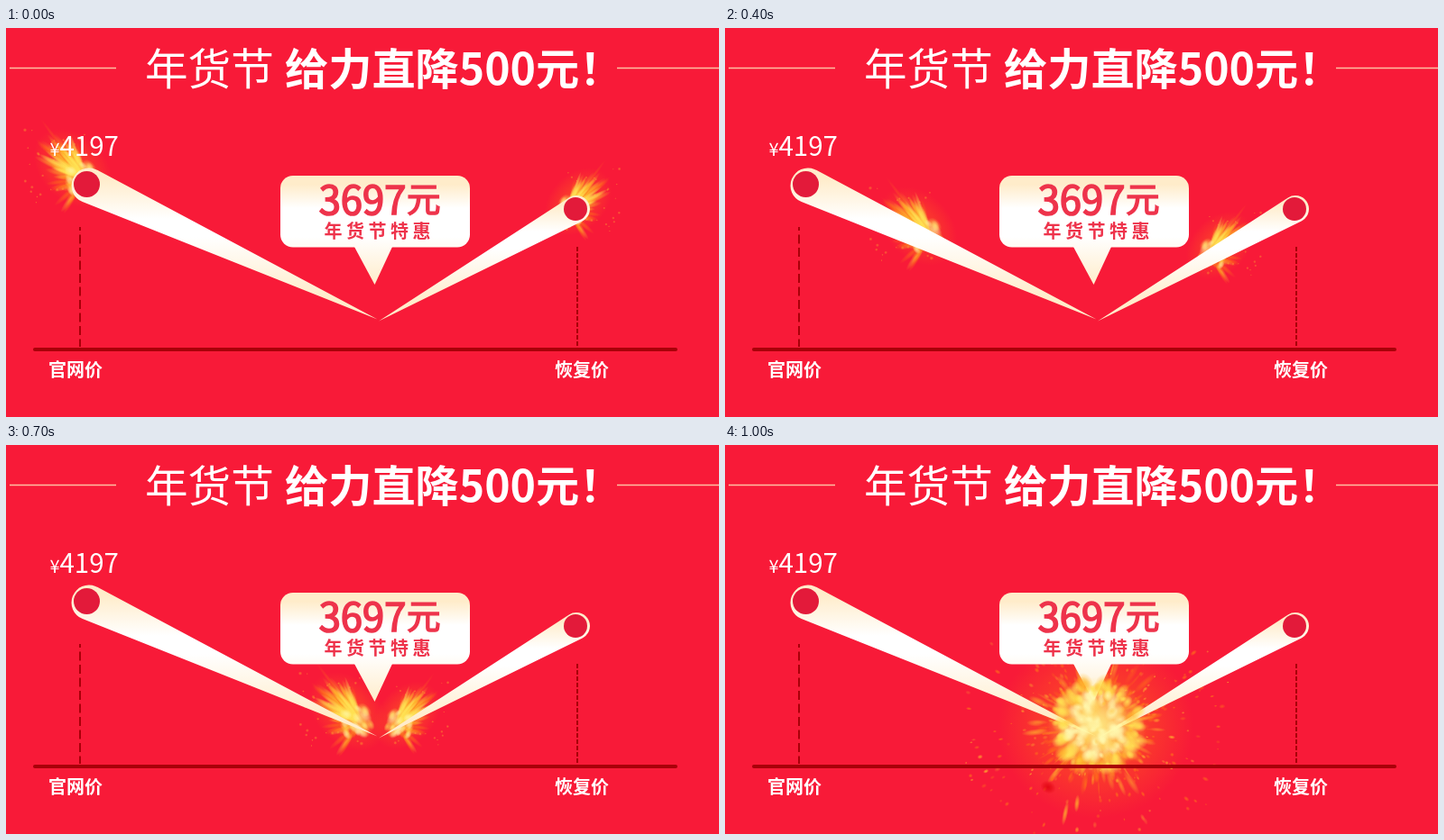
Animation, 790 px wide and 432 px high, one loop 1400 ms. Source, as an HTML page with a canvas:

```html
<!DOCTYPE html>
<html lang="zh-CN">
<head>
<meta charset="utf-8">
<title>年货节</title>
<style>
html, body { margin: 0; width: 100%; height: 100%; overflow: hidden; background: #f81a38; }
canvas { display: block; width: 790px; height: 432px; }
</style>
</head>
<body>
<canvas id="stage" width="790" height="432"></canvas>
<script>
const ctx = document.getElementById('stage').getContext('2d');
const LOOP = 1400, STEP = 100, LAST = 10;
const FONT = '"Noto Sans CJK SC", "Noto Sans CJK", "Noto Sans SC", sans-serif';
const CREAM = '#ffecca', DARK = '#a90009', RED = '#e31a3a', PRICE = '#ee334b';
const ORANGE = '255,112,24', AMBER = '255,184,44', YELLOW = '255,228,84', PALE = '255,249,176';

const TAU = Math.PI * 2;

// positions of the two fireballs along their beams, one per step
const leftX = [88, 108, 132, 161, 228, 299, 347, 393];
const rightX = [622, 602, 577, 549, 536, 519, 474, 432];
const power = [1, 0.75, 0.8, 0.85, 0.95, 1, 1, 1];

function rng(seed) {
  return () => {
    seed = (seed + 0x6d2b79f5) | 0;
    let t = Math.imul(seed ^ (seed >>> 15), 1 | seed);
    t = (t + Math.imul(t ^ (t >>> 7), 61 | t)) ^ t;
    return ((t ^ (t >>> 14)) >>> 0) / 4294967296;
  };
}

function blob(x, y, rx, ry, angle, rgb, alpha) {
  ctx.save();
  ctx.translate(x, y);
  ctx.rotate(angle);
  ctx.scale(rx, ry);
  const g = ctx.createRadialGradient(0, 0, 0, 0, 0, 1);
  g.addColorStop(0, `rgba(${rgb},${alpha})`);
  g.addColorStop(0.5, `rgba(${rgb},${alpha * 0.6})`);
  g.addColorStop(1, `rgba(${rgb},0)`);
  ctx.fillStyle = g;
  ctx.beginPath();
  ctx.arc(0, 0, 1, 0, TAU);
  ctx.fill();
  ctx.restore();
}

function ray(angle, from, len, width, rgb, alpha) {
  const mid = from + len / 2;
  blob(Math.cos(angle) * mid, Math.sin(angle) * mid, len / 2, width, angle, rgb, alpha);
}

function flame(x, y, dir, size, p) {
  const r = rng(21);
  ctx.save();
  ctx.translate(x, y);
  ctx.scale(dir * size, size);
  blob(-14, -12, 50, 36, 0.8, ORANGE, 0.5 * p);
  for (let i = 0; i < 28; i++) {
    const a = -2.35 + (r() + r() - 1) * 0.75;
    ray(a, r() * 24, 22 + r() * 40, 1.6 + r() * 2.6, r() < 0.4 ? ORANGE : AMBER, (0.35 + r() * 0.5) * p);
  }
  for (let i = 0; i < 16; i++) {
    ray(2 + r() * 1.5, 4 + r() * 12, 12 + r() * 30, 1.5 + r() * 2.5, r() < 0.6 ? ORANGE : AMBER, 0.6 * p);
  }
  for (let i = 0; i < 30; i++) {
    const s = 1 + r() * 1.5;
    blob(-70 + r() * 88, -58 + r() * 90, s, s, 0, AMBER, 0.45 * p);
  }
  for (let i = 0; i < 16; i++) {
    const a = -2.3 + (r() - 0.5) * 1.1;
    ray(a, r() * 12, 16 + r() * 36, 1.4 + r() * 2, YELLOW, 0.8 * p);
  }
  blob(-6, -4, 24, 16, 0.8, YELLOW, 0.85 * p);
  for (let i = 0; i < 26; i++) {
    const s = 3 + r() * 5;
    blob(-22 + r() * 34, -16 + r() * 30, s * 1.3, s * 0.8, 0.6 + r() * 0.6, r() < 0.4 ? YELLOW : PALE, 0.6 * p);
  }
  ctx.restore();
}

function halo(x, y, size, rays, sparks, reach) {
  const r = rng(77);
  ctx.save();
  ctx.translate(x, y);
  blob(0, 0, size * 2, size * 1.9, 0, ORANGE, 0.65);
  for (let i = 0; i < rays; i++) {
    const a = r() * TAU;
    ray(a, size * (0.5 + r() * 0.6), size * (0.1 + r() * 0.5), 1.2 + r() * size * 0.06,
      r() < 0.55 ? ORANGE : AMBER, 0.3 + r() * 0.4);
  }
  for (let i = 0; i < sparks; i++) {
    const a = r() * TAU, d = size * (1 + Math.pow(r(), 1.8) * reach), s = 1 + r() * 1.5;
    blob(Math.cos(a) * d, Math.sin(a) * d * 0.92, s * (1 + r()), s, a, r() < 0.6 ? ORANGE : AMBER, 0.25 + r() * 0.6);
  }
  ctx.restore();
}

function core(x, y, size) {
  const r = rng(5);
  ctx.save();
  ctx.translate(x, y);
  blob(0, 0, size * 1.1, size * 1.1, 0, YELLOW, 0.9);
  for (let i = 0; i < 190; i++) {
    const a = r() * TAU, d = size * Math.sqrt(r()), s = size * (0.05 + r() * 0.13);
    const rgb = r() < 0.18 ? AMBER : d > size * 0.72 ? YELLOW : PALE;
    blob(Math.cos(a) * d, Math.sin(a) * d, s * 1.3, s, a + r() - 0.5, rgb, 0.5 + r() * 0.4);
  }
  blob(0, 0, size * 0.75, size * 0.7, 0, PALE, 0.55);
  ctx.restore();
}

function fireBehind(step) {
  if (step < leftX.length) {
    const lx = leftX[step], rx = rightX[step];
    flame(lx, 168 + (lx - 89) * 0.46, 1, 1, power[step]);
    flame(rx, 198 + (631 - rx) * 0.565, -1, 0.86, power[step]);
  } else if (step === 8) {
    flame(406, 316, 1, 0.9, 1);
    flame(420, 316, -1, 0.8, 1);
  } else if (step === 9) {
    halo(415, 313, 32, 60, 50, 1.1);
  } else {
    halo(411, 312, 54, 150, 260, 1.9);
    blob(358, 380, 9, 7, 0.4, '222,0,12', 0.8);
    blob(377, 409, 3, 14, 0.2, AMBER, 0.8);
    blob(390, 398, 3, 10, 0.1, AMBER, 0.8);
  }
}

function fireFront(step) {
  if (step === 8) core(413, 315, 18);
  if (step === 9) core(415, 313, 29);
  if (step === 10) core(412, 312, 50);
}

function fade(top, white1, white2, bottom) {
  const g = ctx.createLinearGradient(0, top, 0, bottom), h = bottom - top;
  g.addColorStop(0, CREAM);
  g.addColorStop(0.08, CREAM);
  g.addColorStop((white1 - top) / h, '#fff');
  g.addColorStop((white2 - top) / h, '#fff');
  g.addColorStop(1, CREAM);
  return g;
}

function disc(x, y, r, fill) {
  ctx.fillStyle = fill;
  ctx.beginPath();
  ctx.arc(x, y, r, 0, TAU);
  ctx.fill();
}

// round head joined to a sharp tip by its two tangents
function beam(x, y, r, tx, ty, fill) {
  const base = Math.atan2(ty - y, tx - x);
  const open = Math.acos(r / Math.hypot(tx - x, ty - y));
  ctx.fillStyle = fill;
  ctx.beginPath();
  ctx.moveTo(tx, ty);
  ctx.arc(x, y, r, base + open, base - open);
  ctx.closePath();
  ctx.fill();
}

function line(x1, y1, x2, y2, color, width, dash = [], offset = 0) {
  ctx.strokeStyle = color;
  ctx.lineWidth = width;
  ctx.setLineDash(dash);
  ctx.lineDashOffset = offset;
  ctx.beginPath();
  ctx.moveTo(x1, y1);
  ctx.lineTo(x2, y2);
  ctx.stroke();
  ctx.setLineDash([]);
}

function text(str, x, y, size, weight, { color = '#fff', spacing = 0, edge = 0 } = {}) {
  ctx.font = `${weight} ${size}px ${FONT}`;
  ctx.letterSpacing = spacing + 'px';
  ctx.fillStyle = ctx.strokeStyle = color;
  ctx.fillText(str, x, y);
  if (edge) {
    ctx.lineWidth = edge;
    ctx.strokeText(str, x, y);
  }
}

function bubble() {
  ctx.fillStyle = fade(164, 200, 232, 285);
  ctx.beginPath();
  ctx.roundRect(304, 164, 210, 79.5, 14);
  ctx.fill();
  ctx.beginPath();
  ctx.moveTo(386, 243);
  ctx.lineTo(428, 243);
  ctx.lineTo(408.5, 285);
  ctx.fill();
  text('3697', 346.7, 206.5, 43.5, 400, { color: PRICE, edge: 1.7 });
  text('元', 444, 204, 37.5, 400, { color: PRICE, edge: 1.5 });
  text('年货节特惠', 352.5, 232.5, 20, 700, { color: PRICE, spacing: 4.5 });
}

function draw(step) {
  ctx.fillStyle = '#f81a38';
  ctx.fillRect(0, 0, 790, 432);
  fireBehind(step);

  line(4, 44.5, 122, 44.5, '#ffc0a2', 1.6);
  line(677, 44.5, 790, 44.5, '#ffc0a2', 1.6);
  text('年货节', 154, 62.6, 47.6, 300);
  text('给力直降500元！', 309, 62.6, 48.2, 700);

  beam(92, 175, 19.5, 411.5, 323.5, fade(155, 212, 232, 300));
  disc(89.5, 173.5, 14.5, RED);
  beam(632, 201, 15, 413, 325.5, fade(186, 226, 245, 305));
  disc(631, 201, 13, RED);

  bubble();
  fireFront(step);

  line(82, 221, 82, 354, DARK, 2, [10, 4.5], 6);
  line(633, 243, 633, 354, DARK, 2, [5, 2]);
  ctx.fillStyle = DARK;
  ctx.beginPath();
  ctx.roundRect(30, 355, 714, 4, 2);
  ctx.fill();

  text('¥', 48.5, 142, 20, 300);
  text('4197', 59.5, 142, 29.5, 400);
  text('官网价', 47, 386.5, 20, 700);
  text('恢复价', 608, 386.5, 20, 700);
}

let shown = -1;
function tick() {
  const step = Math.min(LAST, Math.floor((performance.now() % LOOP) / STEP));
  if (step !== shown) draw(shown = step);
  requestAnimationFrame(tick);
}
tick();
</script>
</body>
</html>
```
